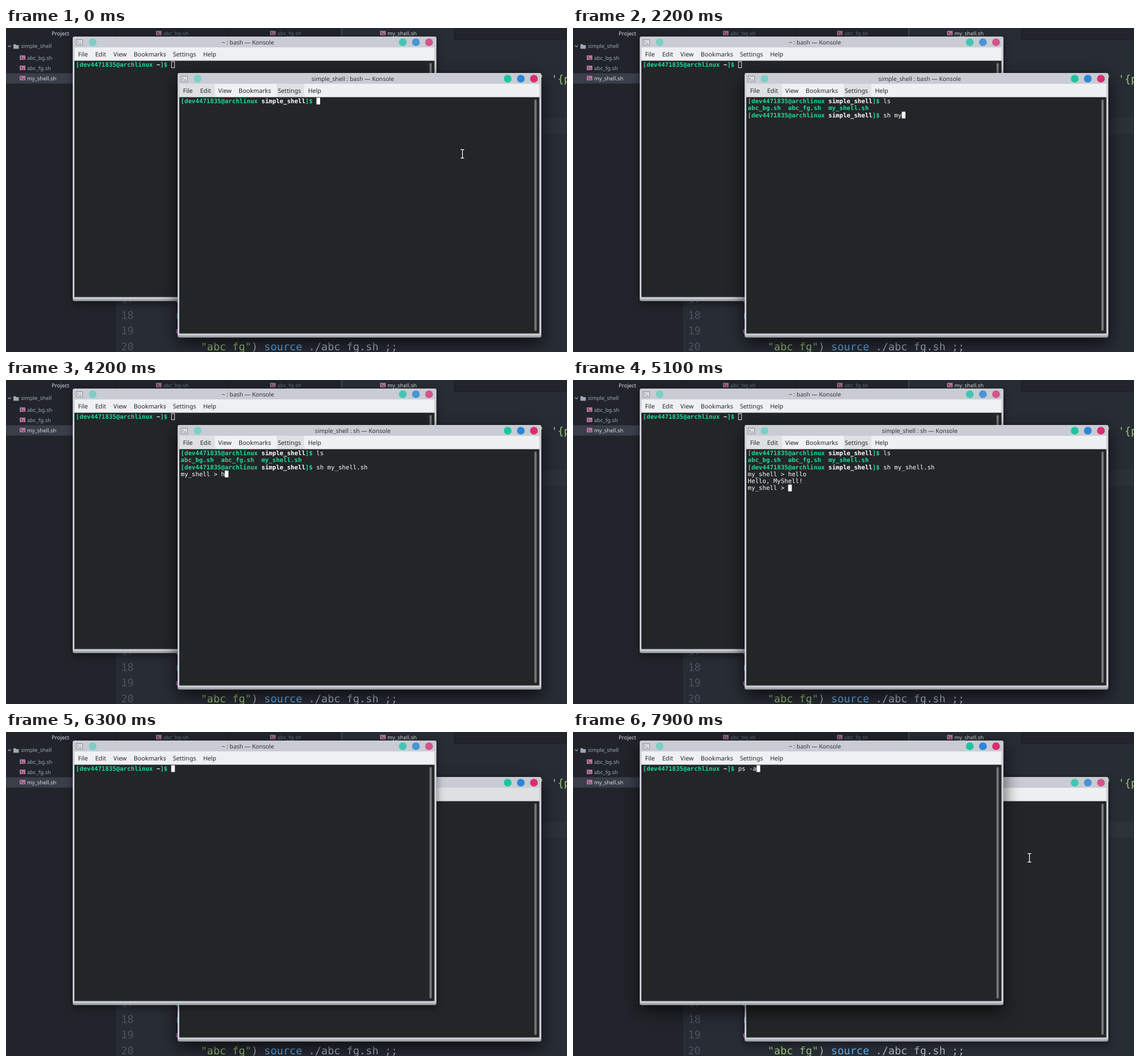
Animation, 984 px wide and 569 px high, one loop 8 s. Source, as an HTML page:

```html
<!DOCTYPE html>
<html lang="en">
<head>
<meta charset="utf-8">
<title>Two shells</title>
<style>
html, body { margin: 0; width: 100%; height: 100%; overflow: hidden; background: #282c34; }
#stage { position: relative; width: 984px; height: 569px; overflow: hidden; }
svg { position: absolute; left: 0; top: 0; display: block; }
text { white-space: pre; text-rendering: geometricPrecision; }
.ui { font: 9.45px "Noto Sans", sans-serif; fill: #9da5b4; }
.code { font: 18.5px "DejaVu Sans Mono", monospace; fill: #abb2bf; }
.title { font: 10.3px "Noto Sans", sans-serif; fill: #31363b; text-anchor: middle; }
.menu { font: 10.7px "Noto Sans", sans-serif; fill: #232629; text-anchor: middle; }
.term { font: 10.68px "DejaVu Sans Mono", monospace; fill: #fcfcfc; }
.g, .w { font-weight: bold; fill: #1cdc9a; }
.w { fill: #fff; }
.win { position: absolute; width: 638px; height: 464.5px; border-radius: 4px 4px 3px 3px;
  box-shadow: 0 4px 14px rgba(0,0,0,.5); }
.win.active { box-shadow: 0 10px 30px rgba(0,0,0,.7); }
.b0 { fill: #42c5b3; } .b1 { fill: #4b93d3; } .b2 { fill: #d4548b; }
.active .b0 { fill: #1cc4a0; } .active .b1 { fill: #2c86d9; } .active .b2 { fill: #da2d6f; }
</style>
</head>
<body>
<div id="stage"></div>
<script>
const LOOP = 8000, COL = 6.43, ROW = 12.25, USER = 'dev4471835';
const stage = document.getElementById('stage');

const rect = (x, y, w, h, fill, more = '') =>
  `<rect x="${x}" y="${y}" width="${w}" height="${h}" fill="${fill}" ${more}/>`;
const text = (cls, x, y, body, more = '') =>
  `<text class="${cls}" x="${x}" y="${y}" ${more}>${body}</text>`;
const tint = (fill, body) => `<tspan style="fill:${fill}">${body}</tspan>`;
const svg = (w, h, body) => `<svg width="${w}" height="${h}" viewBox="0 0 ${w} ${h}">${body}</svg>`;
const escape = s => s.replace(/>/g, '&gt;');

// Editor behind the windows
function shellIcon(x, y, opacity = 1) {
  return `<g transform="translate(${x} ${y})" opacity="${opacity}">` +
    rect(0, 0, 10, 8, '#b5739f', 'rx="1"') +
    '<path d="M1.8 2l2 1.7-2 1.7M4.8 5.9h2.8" fill="none" stroke="#21252b" stroke-width="1"/></g>';
}

function editor() {
  const edge = '#181a1f', blue = '#61afef', green = '#98c379';
  let s = rect(0, 0, 984, 569, '#282c34') + rect(192, 158, 792, 28, '#2c313a') +
    rect(0, 0, 192, 569, '#21252b') + rect(192, 0, 792, 20, '#21252b') +
    rect(192, 20, 792, 1, edge) + rect(589, 0, 197, 21, '#282c34');
  for (const x of [191.5, 390, 786]) s += rect(x, 0, 1, 20, edge);
  s += rect(191.5, 20, 1, 549, '#1c1f25') + rect(588, 0, 1.3, 20, '#4b5363');

  [['abc_bg.sh', 263], ['abc_fg.sh', 463], ['my_shell.sh', 656]].forEach(([name, x], i) => {
    s += shellIcon(x, 5, i < 2 ? .8 : 1) +
      text('ui', x + 13, 12.7, name, `style="fill:${i < 2 ? '#666d7a' : '#d7dae0'}"`);
  });

  s += text('ui', 95.5, 12.7, 'Project', 'text-anchor="middle" style="fill:#d7dae0"') +
    '<path d="M3.5 30.5l2.5 2.6 2.5-2.6" fill="none" stroke="#9da5b4" stroke-width="1.1"/>' +
    '<path d="M13 28.5h4l1 1.5h4.5v6.5h-9.5z" fill="#9da5b4"/>' +
    text('ui', 26, 35.2, 'simple_shell') + rect(0, 79.5, 191.5, 18, '#3a3f4b');
  ['abc_bg.sh', 'abc_fg.sh', 'my_shell.sh'].forEach((name, i) => {
    s += shellIcon(24, 48 + 18 * i) +
      text('ui', 37, 55.5 + 18 * i, name, i == 2 ? 'style="fill:#d7dae0"' : '');
  });

  const lines = [
    [296.8, tint(blue, 'echo')],
    [296.8, tint(blue, 'read')],
    [296.8, tint('#c678dd', 'case')],
    [341.4, `${tint(green, '"abc_fg"')}) ${tint(blue, 'source')} ./abc_fg.sh ;;`]
  ];
  lines.forEach(([x, body], i) => {
    const y = 483.2 + 27.5 * i;
    s += text('code', 201.7, y, 17 + i, 'style="fill:#4b5364"') + text('code', x, y, body);
  });
  return s + text('code', 934, 96.2, "' '{p", `style="fill:${green}"`);
}

// A terminal window; parts that change are filled in by render()
function addWindow(x, y) {
  const el = document.createElement('div');
  el.className = 'win';
  el.style.left = x + 'px';
  el.style.top = y + 'px';
  const frame = '#c9ccd3';
  let s = rect(0, 0, 638, 464.5, '#a3a8ae', 'rx="3.5"') + rect(0, 0, 638, 461, frame, 'rx="3.5"') +
    rect(3, 19, 631.5, 23.5, '#eff0f1', 'class="bar"') + '<g class="light"></g>' +
    rect(3, 42.5, 631.5, 415, '#232627') + rect(625.8, 46.5, 4, 406.5, '#727677', 'rx="2"') +
    rect(6, 5.5, 11.5, 9.5, '#d9dce0', 'stroke="#858a91" stroke-width=".9"') +
    '<path d="M8 8l2 1.8-2 1.8M11.5 12.2h3" fill="none" stroke="#6f747b" stroke-width=".9"/>' +
    '<circle cx="35" cy="10" r="6.8" fill="#7ccfc6"/>';
  [579, 602, 625].forEach((cx, i) => s += `<circle class="b${i}" cx="${cx}" cy="10" r="6.8"/>`);
  s += text('title', 307.2, 13.7, '');
  const menu = { File: 18, Edit: 49, View: 83, Bookmarks: 135.5, Settings: 196, Help: 240.3 };
  for (const name in menu) s += text('menu', menu[name], 35.4, name);
  el.innerHTML = svg(638, 464.5, s + '<g class="screen"></g>');
  stage.append(el);
  const part = c => el.querySelector('.' + c);
  return { el, title: part('title'), bar: part('bar'), light: part('light'), screen: part('screen') };
}

// Steps: time, row, content. "$" stands for the prompt, "*" for a listing.
const backSteps = [
  [0, 0, '$'], [6700, 0, '$p'], [6900, 0, '$pa'], [7300, 0, '$p'], [7400, 0, '$ps'],
  [7600, 0, '$ps '], [7800, 0, '$ps -'], [7900, 0, '$ps -a']
];
const frontSteps = [
  [0, 0, '$'], [300, 0, '$l'], [400, 0, '$ls'], [500, 1, ''],
  [600, 1, '*abc_bg.sh  abc_fg.sh  my_shell.sh'], [600, 2, '$'],
  [1100, 2, '$m'], [1500, 2, '$'], [1600, 2, '$s'], [1700, 2, '$sh'], [1800, 2, '$sh '],
  [2000, 2, '$sh m'], [2200, 2, '$sh my'], [2700, 2, '$sh my_shell.sh '],
  [3000, 3, 'my_shell > '], [4200, 3, 'my_shell > h'], [4400, 3, 'my_shell > he'],
  [4500, 3, 'my_shell > hel'], [4700, 3, 'my_shell > hell'], [4800, 3, 'my_shell > hello'],
  [5100, 4, 'Hello, MyShell!'], [5100, 5, 'my_shell > ']
];

function screen(steps, t, dir, filled) {
  const rows = [];
  for (const [time, row, body] of steps) if (time <= t) rows[row] = body;
  let s = '', cols = 0;
  rows.forEach((row, i) => {
    const body = escape(row.replace(/^[$*]/, ''));
    let line = body;
    cols = row.length;
    if (row[0] == '$') {
      const who = `[${USER}@archlinux `;
      line = `<tspan class="g">${who}</tspan><tspan class="w">${dir}</tspan>` +
        `<tspan class="g">]$ </tspan>${body}`;
      cols += who.length + dir.length + 2;
    } else if (row[0] == '*') {
      line = `<tspan class="g">${body}</tspan>`;
    }
    s += text('term', 5.6, 53.1 + ROW * i, line);
  });
  const x = 5.6 + COL * cols, y = 43.4 + ROW * (rows.length - 1);
  return s + (filled ? rect(x, y, COL, 11.9, '#fcfcfc')
    : rect(x + .5, y + .6, COL - 1, 10.8, 'none', 'stroke="#fcfcfc" stroke-width=".9"'));
}

stage.innerHTML = svg(984, 569, editor());
const back = addWindow(117, 15), front = addWindow(301, 79);
stage.insertAdjacentHTML('beforeend', `<svg id="mouse" style="z-index:3" width="984" height="569">
<g fill="none" stroke-linecap="square"><path id="beam" stroke="#111" stroke-width="3.4"
d="M798 213.5h1.6l1 .8 1-.8h1.6M800.6 214.3v13.4M798 228.5h1.6l1-.8 1 .8h1.6"/>
<use href="#beam"/></g></svg>`);
const mouse = document.getElementById('mouse');
const beam = document.getElementById('beam');
mouse.querySelector('use').remove();
const core = beam.cloneNode();
core.removeAttribute('id');
core.setAttribute('stroke', '#fff');
core.setAttribute('stroke-width', '1.4');
beam.after(core);

const times = [...new Set([...backSteps, ...frontSteps].map(s => s[0]).concat(3100, 6100, 6300, 6400))];
let shown = -1;

function render(t) {
  const step = Math.max(...times.filter(time => time <= t));
  if (step == shown) return;
  shown = step;
  const raised = t >= 6300, switched = t >= 6400;

  back.el.style.zIndex = raised ? 2 : 1;
  front.el.style.zIndex = raised ? 1 : 2;
  back.el.classList.toggle('active', switched);
  front.el.classList.toggle('active', !switched);

  back.title.textContent = '~ : bash — Konsole';
  front.title.textContent = `simple_shell : ${t < 3100 ? 'bash' : 'sh'} — Konsole`;
  front.bar.setAttribute('fill', switched ? '#eff0f1' : '#dfe0e2');
  front.light.innerHTML = t < 6100
    ? rect(65.5, 19, 108.5, 23.5, '#eff0f1') + rect(222, 19, 412.5, 23.5, '#eff0f1') : '';

  back.screen.innerHTML = screen(backSteps, t, '~', raised);
  front.screen.innerHTML = screen(frontSteps, t, 'simple_shell', !raised);
  mouse.style.display = t < 300 || switched ? '' : 'none';
}

const start = performance.now();
function tick() {
  render((performance.now() - start) % LOOP);
  requestAnimationFrame(tick);
}
render(0);
tick();
</script>
</body>
</html>
```
